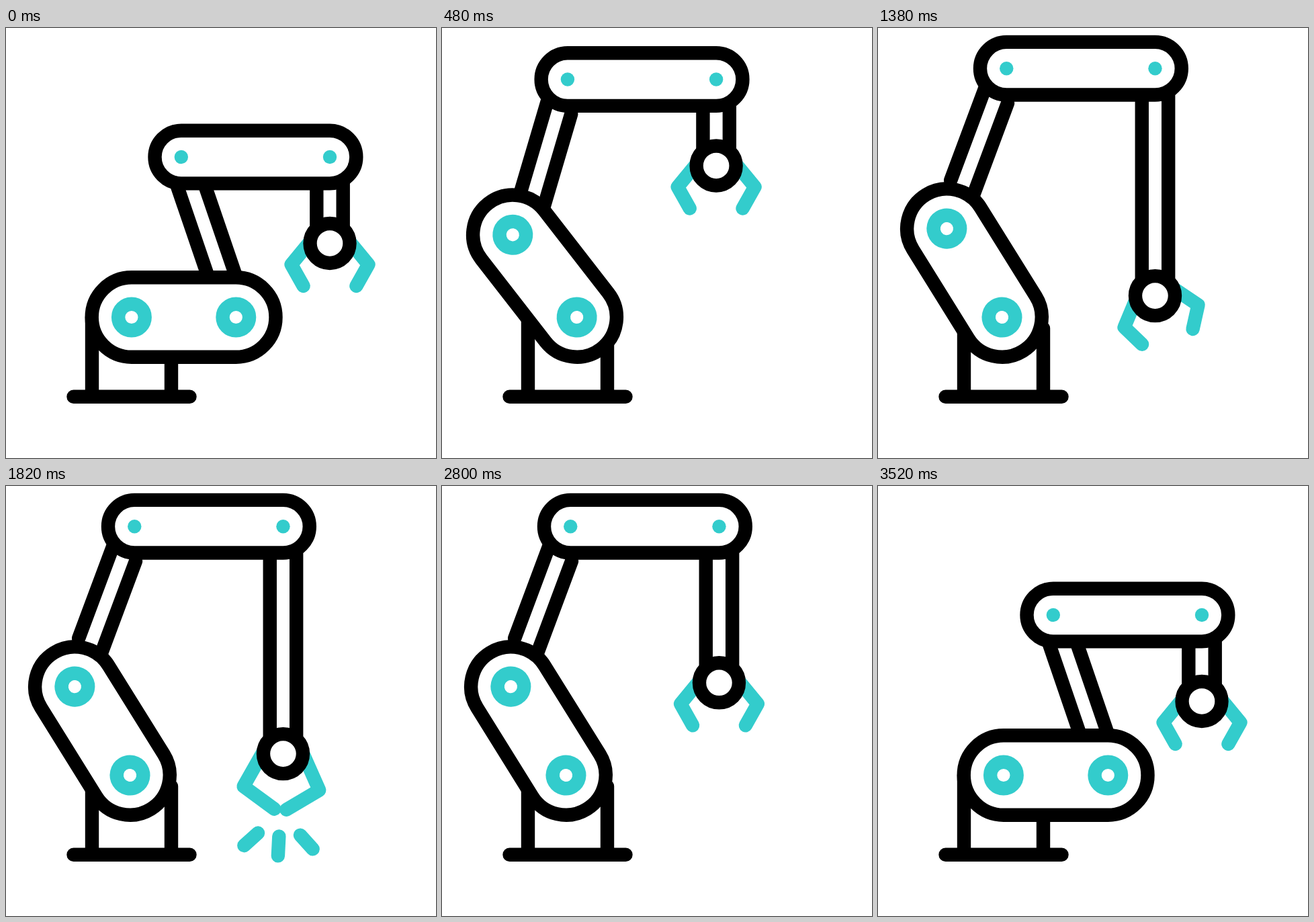
Animation of 640 by 640 pixels, one loop 3.6 s. Source, as an HTML page:

```html
<!DOCTYPE html>
<html lang="en">
<head>
<meta charset="utf-8">
<title>Robot arm</title>
<style>
  html, body { margin: 0; width: 100%; height: 100%; overflow: hidden; background: #fff; }
  svg { display: block; width: 100vw; height: 100vh; }
  .ink, .teal { fill: none; stroke: #000; stroke-width: 20.4; stroke-linecap: round; stroke-linejoin: round; }
  .teal { stroke: #3cc; }
  .solid { fill: #fff; }
  .dot { fill: #3cc; }
</style>
</head>
<body>
<svg viewBox="0 0 640 640">
  <g id="hand">
    <g id="grip" class="teal">
      <path id="clawL"/>
      <path id="clawR"/>
      <path id="sparks"/>
    </g>
    <path id="rods" class="ink"/>
    <circle class="ink solid" r="29.5"/>
  </g>

  <g id="arm" class="ink">
    <path d="M-19.7 35V185M19.7 48V197"/>
  </g>

  <g id="bar">
    <rect class="ink solid" x="-39.3" y="-39.3" width="299.8" height="78.6" rx="39.3"/>
    <circle class="dot" r="10.2"/>
    <circle class="dot" cx="221.2" r="10.2"/>
  </g>

  <path class="ink" d="M100.5 548.7H273.5M128 430.5V548.7M246 447V548.7"/>

  <g id="body">
    <rect class="ink solid" x="-214.6" y="-59.2" width="273.8" height="118.4" rx="59.2"/>
    <circle class="teal" r="19.8"/>
    <circle class="teal" cx="-155.4" r="19.8"/>
  </g>
</svg>
<script>
  const LOOP = 3600, REACH = 155.4, RAD = Math.PI / 180;
  const $ = id => document.getElementById(id);
  const mix = (a, b, k) => a + (b - a) * k;
  const ease = s => s * s * (3 - 2 * s);

  // Eased keyframes as [time, value] pairs
  const lift  = [[0, 0], [600, 1], [3000, 1], [3520, 0]];
  const drop  = [[600, 128.4], [1000, 338.4], [2600, 338.4], [3000, 128.4]];
  const swing = [[600, 0], [1000, 20], [1300, -20], [1700, 10], [2000, -10], [2400, 0]];
  const pinch = [[1600, 0], [1900, 1], [2200, 0], [2400, 1], [2600, 0]];

  function at(keys, t) {
    if (t <= keys[0][0]) return keys[0][1];
    for (let i = 1; i < keys.length; i++) {
      const [t0, v0] = keys[i - 1], [t1, v1] = keys[i];
      if (t < t1) return mix(v0, v1, ease((t - t0) / (t1 - t0)));
    }
    return keys[keys.length - 1][1];
  }

  function place(id, x, y, deg = 0) {
    $(id).setAttribute('transform', `translate(${x} ${y}) rotate(${deg})`);
  }

  function claw(side, k) {
    const x = v => side * v;
    return `M${x(29)} -3L${x(mix(57.4, 56.2, k))} ${mix(31.5, 55.5, k)}` +
           `L${x(mix(39.4, 2.6, k))} ${mix(63.5, 86.7, k)}`;
  }

  function draw(t) {
    const p = at(lift, t), k = at(pinch, t), fall = at(drop, t);

    // The body slides and tilts while the arm's foot travels along it
    const tilt = 58.1 * p, bx = 342.3 - 157.8 * p, by = 430.5;
    const footX = bx - REACH * p * Math.cos(tilt * RAD);
    const footY = by - REACH * p * Math.sin(tilt * RAD);
    const lean = 18.87 - 39.32 * p, len = 252 + 2.4 * p;
    const x = footX - len * Math.sin(lean * RAD);
    const y = footY - len * Math.cos(lean * RAD);

    place('body', bx, by, tilt);
    place('arm', x, y, -lean);
    place('bar', x, y);
    place('hand', x + 221.2, y + fall);
    place('grip', 0, 0, at(swing, t));

    const top = 34 - fall;
    $('rods').setAttribute('d', `M-19.7 ${top}V-22M19.7 ${top}V-22`);
    $('clawL').setAttribute('d', claw(-1, k));
    $('clawR').setAttribute('d', claw(1, k));
    const d = 23.8 * k;
    $('sparks').setAttribute('d', k > 0.001
      ? `M-31.5 119.6l${-d} ${d}M0 123v${35 * k}M31.5 119.6l${d} ${d}` : '');
  }

  const start = performance.now();
  function tick() {
    draw((performance.now() - start) % LOOP);
    requestAnimationFrame(tick);
  }
  draw(0);
  requestAnimationFrame(tick);
</script>
</body>
</html>
```
